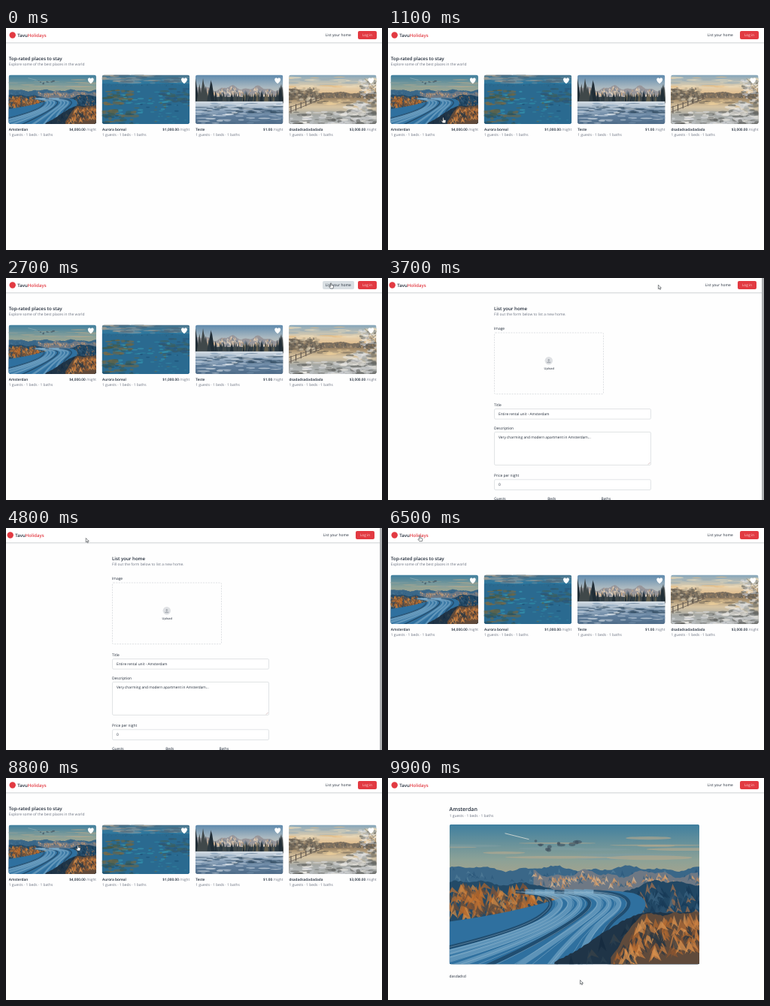
Recreate the animation shown at these times as an HTML page. Size 500 by 296 pixels, loop 10 s.

```html
<!DOCTYPE html>
<html lang="en">
<head>
<meta charset="utf-8">
<title>Vacation rentals</title>
<style>
html, body { margin: 0; width: 100%; height: 100%; overflow: hidden; background: #fefefe; }
svg { display: block; }
#stage { width: 100vw; height: 100vh; }
text { font-family: "Open Sans", "Noto Sans", sans-serif; text-rendering: geometricPrecision; white-space: pre; }
</style>
</head>
<body>
<svg id="stage" viewBox="0 0 500 296" xmlns="http://www.w3.org/2000/svg"></svg>
<script>
const INK = '#1f2937', GREY = '#6b7280', RED = '#e23a42';
const stage = document.getElementById('stage');

let seed = 11;
const rnd = (a, b) => {
  seed = (seed * 16807) % 2147483647;
  return a + (b - a) * (seed / 2147483647);
};
const pick = list => list[Math.floor(rnd(0, list.length))];
const repeat = (n, fn) => Array.from({ length: n }, (_, i) => fn(i)).join('');
const ease = f => f * f * (3 - 2 * f);
const ramp = (x, a, b) => ease(Math.min(1, Math.max(0, (x - a) / (b - a))));

const text = (x, y, size, str, more = '') =>
  `<text x="${x}" y="${y}" font-size="${size}" fill="${INK}" ${more}>${str}</text>`;
const bold = 'font-weight="600"';
const grey = `style="fill:${GREY}"`;
const path = (d, fill, more = '') => `<path d="${d}" fill="${fill}" ${more}/>`;
const line = (d, stroke, w, more = '') =>
  `<path d="${d}" fill="none" stroke="${stroke}" stroke-width="${w}" ${more}/>`;
const rect = (x, y, w, h, fill, more = '') =>
  `<rect x="${x}" y="${y}" width="${w}" height="${h}" fill="${fill}" ${more}/>`;
const oval = (x, y, rx, ry, fill, more = '') =>
  `<ellipse cx="${x}" cy="${y}" rx="${rx}" ry="${ry}" fill="${fill}" ${more}/>`;

// Landscapes share one W x H canvas.
const W = 333, H = 187;

// Vertical blend of evenly spaced colours from y down to the bottom.
let blends = 0;
function blend(y, ...colors) {
  const id = `blend${blends++}`;
  const stops = colors.map((c, i) => `<stop offset="${i / (colors.length - 1)}" stop-color="${c}"/>`).join('');
  return `<linearGradient id="${id}" x2="0" y2="1">${stops}</linearGradient>` + rect(0, y, W, H - y, `url(#${id})`);
}

// A range below the skyline top(x), with slanted facets.
function range(x1, x2, top, depth, fill, tints, n, size) {
  let d = `M${x1} ${H}`;
  for (let x = x1; x <= x2; x += 3) d += `L${x} ${top(x) + rnd(-1, 1)}`;
  const facets = repeat(n, () => {
    const x = rnd(x1, x2), y = top(x) + rnd(0, depth), w = rnd(.2, .5) * size, h = rnd(.4, 1) * size;
    return path(`M${x} ${y}l${w} ${h}l${-w} ${-h * .3}l${-w * .6} ${h * .4}Z`, pick(tints), 'opacity=".7"');
  });
  return path(`${d}L${x2} ${H}Z`, fill) + facets;
}
const peaks = (y, amp, len) => x =>
  y - amp * (.6 * Math.sin(x / len) + .4 * Math.sin(x / len * 2.3 + 1));

const specks = (n, [x1, x2], [y1, y2], w, h, tints) => repeat(n, () =>
  oval(rnd(x1, x2), rnd(y1, y2), rnd(.3, 1) * w, rnd(.3, 1) * h, pick(tints), 'opacity=".6"'));
const pines = (n, [x1, x2], y, [h1, h2], tints) => repeat(n, () => {
  const h = rnd(h1, h2);
  return path(`M${rnd(x1, x2)} ${y - h}l${h * .15} ${h}h${-h * .3}Z`, pick(tints));
});

function glacier() {
  const bend = i => {
    const x = 130 + i * 13;
    return `M${i * 42 - 120} 190Q${x - 45} 150 ${x - 8} 122T${x - 42} 90`;
  };
  return blend(0, '#3f7f9f', '#8ba197', '#c4a680', '#a58d78', '#4c7794') +
    specks(14, [0, W], [18, 46], 70, 3, ['#7f9da2', '#b9aa8e']) +
    specks(12, [115, 175], [22, 37], 6, 2.5, ['#3d4e5c']) +
    line('M74 12L106 20', '#c5d0cd', 1) +
    range(0, W, peaks(59, 4, 17), 14, '#3a6788', ['#557f9a', '#2c587b'], 60, 9) +
    range(112, W, peaks(66, 6, 13), 12, '#6e7884', ['#dda36c', '#e5bd92', '#345d7c', '#c58a5c'], 110, 10) +
    range(0, 168, x => peaks(78, 4, 16)(x) + 20 * ramp(x, 95, 168), 32, '#234a67',
      ['#c07434', '#d28a45', '#8a5531', '#b0662c', '#5a4a3f'], 190, 22) +
    range(222, W, x => peaks(78, 4, 14)(x) + 14 * (1 - ramp(x, 222, 262)), 34, '#214764',
      ['#3a6380', '#183a56', '#a8734c', '#2d526e'], 90, 18) +
    path(`M0 130Q90 118 160 95Q200 84 245 92Q275 102 250 125L190 ${H}H0Z`, '#2f709f') +
    repeat(9, i => line(bend(i), i % 4 ? '#6d9fc0' : '#1b4260', i % 4 ? 7 : 5, 'opacity=".75"')) +
    repeat(14, i => line(bend(i * .6), '#a9c6d8', .8, 'opacity=".5"')) +
    range(140, W, x => 188 - 70 * ramp(x, 115, 270), 52, '#1f3447', ['#162c3f', '#2b4050', '#3b4448'], 90, 22) +
    range(215, W, x => peaks(119, 3, 12)(x) + 60 * (1 - ramp(x, 205, 265)), 44, '#5f4a3b',
      ['#cd8140', '#b3682e', '#2a3742', '#dc9550', '#8a552f'], 130, 22);
}

function islands() {
  const land = ['#47573f', '#6b6746', '#375a57', '#7d6b45'];
  return blend(0, '#46738d', '#237ba6', '#1f76a6', '#1a5f8e', '#174f7c') +
    range(0, W, peaks(34, 2, 30), 5, '#2a6a90', ['#3b7390', '#265876'], 35, 8) +
    specks(50, [0, W], [0, 32], 34, 5, ['#8b9ba0', '#4b6779', '#b3a48f', '#688798']) +
    specks(45, [0, 110], [58, 115], 20, 6, land) +
    specks(40, [225, W], [52, 110], 20, 5, ['#34586a', '#3f5f59', '#2a5577']) +
    specks(40, [60, 270], [60, 150], 13, 4, ['#2d96ae', '#389bb4', '#59644a']) +
    specks(35, [0, 130], [135, H], 20, 7, ['#234d60', ...land]) +
    specks(30, [110, W], [110, H], 10, 3, ['#194b72', '#31839f', '#6d6648']);
}

function river() {
  const dark = ['#202d36', '#2d3a41', '#40484a'];
  return blend(0, '#5d89ad', '#a9b8c0', '#d5c8b5', '#a6b4c1', '#6784a0') +
    range(0, W, x => peaks(48, 11, 17)(x) + 12 * Math.abs(x / W - .5), 35, '#97969b',
      ['#e8c69e', '#f1dfc6', '#657789', '#d4ad85'], 180, 18) +
    rect(0, 84, W, 18, '#38454a') +
    pines(110, [0, W], 102, [16, 42], [...dark, '#65604f']) +
    pines(9, [0, 65], 108, [55, 95], dark) + pines(6, [295, W], 108, [45, 75], dark) +
    blend(101, '#d5dde4', '#9db2c6', '#5d7b99', '#526f8b') +
    specks(30, [0, W], [120, 150], 40, 4, ['#2b4358', '#3c5870']) +
    specks(90, [0, W], [102, H], 28, 4, ['#e3e9ee', '#7d9ab5', '#bac9d7', '#4b6985']);
}

function lake() {
  const snow = ['#efece4', '#d5d8da', '#a6a8a6', '#60615e'];
  const branch = () => {
    const x = rnd(285, W), y = rnd(30, 105);
    return line(`M${x} ${y}l${rnd(-28, 10)} ${rnd(-22, 8)}`, '#4c4845', 1.5);
  };
  return blend(0, '#83a5bc', '#e5d0ad', '#ddaf75', '#b6a38a', '#77838a') +
    specks(30, [0, W], [6, 46], 45, 5, ['#f1dfbd', '#99acb5', '#e6bd82']) +
    range(0, W, x => peaks(68, 4, 24)(x) - 14 * (1 - ramp(x, 0, 150)), 18, '#7d705f',
      ['#4d5150', '#a48762', '#c0a585'], 90, 14) +
    blend(88, '#9c8463', '#d9c5a2', '#a5a8a5', '#b9bec1') +
    specks(16, [110, 245], [94, 112], 28, 3, ['#f5d69f', '#564f47']) +
    specks(80, [0, 115], [48, 105], 10, 7, ['#5f5b50', '#b9a88b', '#ddd0b8', '#837968']) +
    specks(120, [0, W], [140, H], 20, 6, snow) +
    specks(60, [225, W], [100, H], 24, 9, snow) +
    repeat(7, i => line(`M${8 + i * 19} ${146 - i * 9}v${-28 + i * 2}`, '#514a43', 3)) +
    line('M0 124L130 82M0 142L130 90', '#6e6358', 2.5) +
    repeat(32, branch) + specks(65, [270, W], [20, 110], 12, 5, snow);
}

const facts = (x, y) => text(x, y, 4.9, '1 guests · 1 beds · 1 baths', grey);
const heart = 'M0 3.9C-5.2 .1-4.5-3.8-2-3.8-.9-3.8-.3-3.2 0-2.5.3-3.2.9-3.8 2-3.8 4.5-3.8 5.2 .1 0 3.9Z';
const photo = (i, x, y, w, h, radius) => `<svg x="${x}" y="${y}" width="${w}" height="${h}"
  viewBox="0 0 ${W} ${H}" preserveAspectRatio="none"><g clip-path="url(#${radius})"><use href="#scene${i}"/></g></svg>`;

function card([name, price], i) {
  const x = 3.5 + i * 124.2;
  return photo(i, x, 62.5, 116.5, 65.5, 'small') +
    path(heart, '#fff', `transform="translate(${x + 109.3} 70.3)"`) +
    text(x + .3, 136.5, 4.8, name, bold) +
    text(x + 116.5, 136.5, 4.75, `<tspan ${bold}>${price}</tspan><tspan fill="${GREY}"> /night</tspan>`, 'text-anchor="end"') +
    facts(x + .3, 144.3);
}

const field = (y, h, label, value) =>
  text(141, y - 3.4, 4.9, label) +
  rect(141.5, y, 208, h, '#fff', 'rx="1.5" stroke="#d5d8dc" stroke-width=".7"') +
  text(147, y + 8.6, 4.8, value);

const homes = [['Amsterdan', '$4,000.00'], ['Aurora boreal', '$1,000.00'], ['Teste', '$1.00'], ['dsadadsadadadada', '$3,000.00']];

stage.innerHTML = `
<defs>
  <clipPath id="small"><rect width="${W}" height="${H}" rx="9"/></clipPath>
  <clipPath id="large"><rect width="${W}" height="${H}" rx="3"/></clipPath>
  ${[glacier, islands, river, lake].map((scene, i) => `<g id="scene${i}">${scene()}</g>`).join('')}
</defs>
<g id="header">
  ${rect(-5, 0, 510, 19.4, '#fff')}${rect(-5, 19.2, 510, 1, '#d5d7da')}${rect(-5, 20.2, 510, 1, '#eeeff0')}
  ${oval(8.7, 9.5, 4.2, 4.2, RED)}
  ${text(15.3, 11.7, 6, `Tavu<tspan fill="${RED}">Holidays</tspan>`, bold)}
  ${rect(421, 4, 42, 11, '#d9dfe3', 'id="hover" rx="2"')}
  ${text(424.8, 11.4, 4.9, 'List your home')}
  ${rect(468, 4, 25, 11, RED, 'rx="2"')}
  ${text(480.5, 11.4, 4.7, 'Log in', 'text-anchor="middle" style="fill:#fbdcdd"')}
</g>
<g id="home">
  ${text(3.8, 42.6, 6.2, 'Top-rated places to stay', bold)}
  ${text(3.8, 50.3, 4.9, 'Explore some of the best places in the world', grey)}
  ${homes.map(card).join('')}
</g>
<g id="form">
  ${text(141, 42.6, 6.1, 'List your home', bold)}
  ${text(141, 50.2, 4.9, 'Fill out the form below to list a new home.', grey)}
  ${text(141, 68.6, 4.9, 'Image')}
  ${rect(141.5, 73, 145, 81.7, 'none', 'rx="1.5" stroke="#d0d3d7" stroke-width=".7" stroke-dasharray="2 1.4"')}
  ${oval(213.8, 110.3, 5.2, 5.2, '#dfe1e4')}
  ${line('M213.8 112v-3.4m-1.3 1.2l1.3-1.3 1.3 1.3M211.8 111.7v1h4v-1', '#737b85', .6)}
  ${text(214.3, 122.2, 4, 'Upload', 'text-anchor="middle"')}
  ${field(174.6, 13.5, 'Title', 'Entire rental unit - Amsterdam')}
  ${field(205.4, 44, 'Description', 'Very charming and modern apartment in Amsterdam...')}
  ${line('M346 248.5l2.5-2.5', '#a6787f', .5)}
  ${field(268.8, 13.7, 'Price per night', '0')}
  ${['Guests', 'Beds', 'Baths'].map((s, i) => text(141 + i * 71.2, 295.7, 4.9, s)).join('')}
  ${rect(497, 0, 3, 296, '#adafb1')}
</g>
<g id="detail">
  ${text(81.6, 43.7, 7, 'Amsterdan', bold)}
  ${facts(81.7, 51.9)}
  ${photo(0, 81.6, 61.8, 332.6, 186.6, 'large')}
  ${text(81.6, 265.8, 4.9, 'dasdadsd')}
</g>
<g id="cursor" stroke="#24292f" stroke-width=".55" stroke-linejoin="round" fill="#fff">
  <path id="arrow" d="M0 0V5.5L1.3 4.3 2.2 6.3 3.1 5.9 2.2 4H4Z"/>
  <path id="hand" d="M-.6 0Q0-.7.7 0V2.6L3 3.1Q3.7 3.3 3.6 4.2L3 7H-.5L-2.4 4.5Q-2.2 3.4-.6 4.5Z"/>
</g>`;

const LOOP = 10000, STEP = 100;
// Pointer moves: start, end, x, y.
const moves = [
  [600, 1400, 38, 38], [1800, 2700, 432, 7], [3500, 4100, 152, 15.5],
  [4400, 5300, 42.3, 10.7], [6800, 7100, 95.5, 90], [8800, 9200, 255.5, 269.5]
];

function pointer(t) {
  let x = 150, y = 296;
  for (const [from, to, x2, y2] of moves) {
    const f = ramp(t, from, to);
    x += (x2 - x) * f;
    y += (y2 - y) * f;
  }
  return [x, y];
}

const el = id => document.getElementById(id);
const show = (id, on) => el(id).setAttribute('display', on ? 'inline' : 'none');

function draw(ms) {
  const t = Math.floor((ms % LOOP) / STEP) * STEP;
  const page = t >= 9900 ? 'detail' : t >= 3600 && t < 5500 ? 'form' : 'home';
  const [x, y] = pointer(t);
  const shift = page === 'form' ? -3 : 0;
  const inBar = y > 3 && y < 15;
  const onLink = inBar && x > 421 + shift && x < 463 + shift;
  const onLogo = inBar && x < 58;
  const onCard = page === 'home' && y > 62 && y < 146 && (x - 3.5) % 124.2 < 116.5;
  const hand = onLink || onLogo || onCard;

  for (const id of ['home', 'form', 'detail']) show(id, id === page);
  el('header').setAttribute('transform', `translate(${shift} 0)`);
  show('hover', onLink);
  show('cursor', t >= 700);
  show('hand', hand);
  show('arrow', !hand);
  el('cursor').setAttribute('transform', `translate(${x} ${y})`);
}

const start = performance.now();
function tick() {
  draw(performance.now() - start);
  requestAnimationFrame(tick);
}
tick();
</script>
</body>
</html>
```
